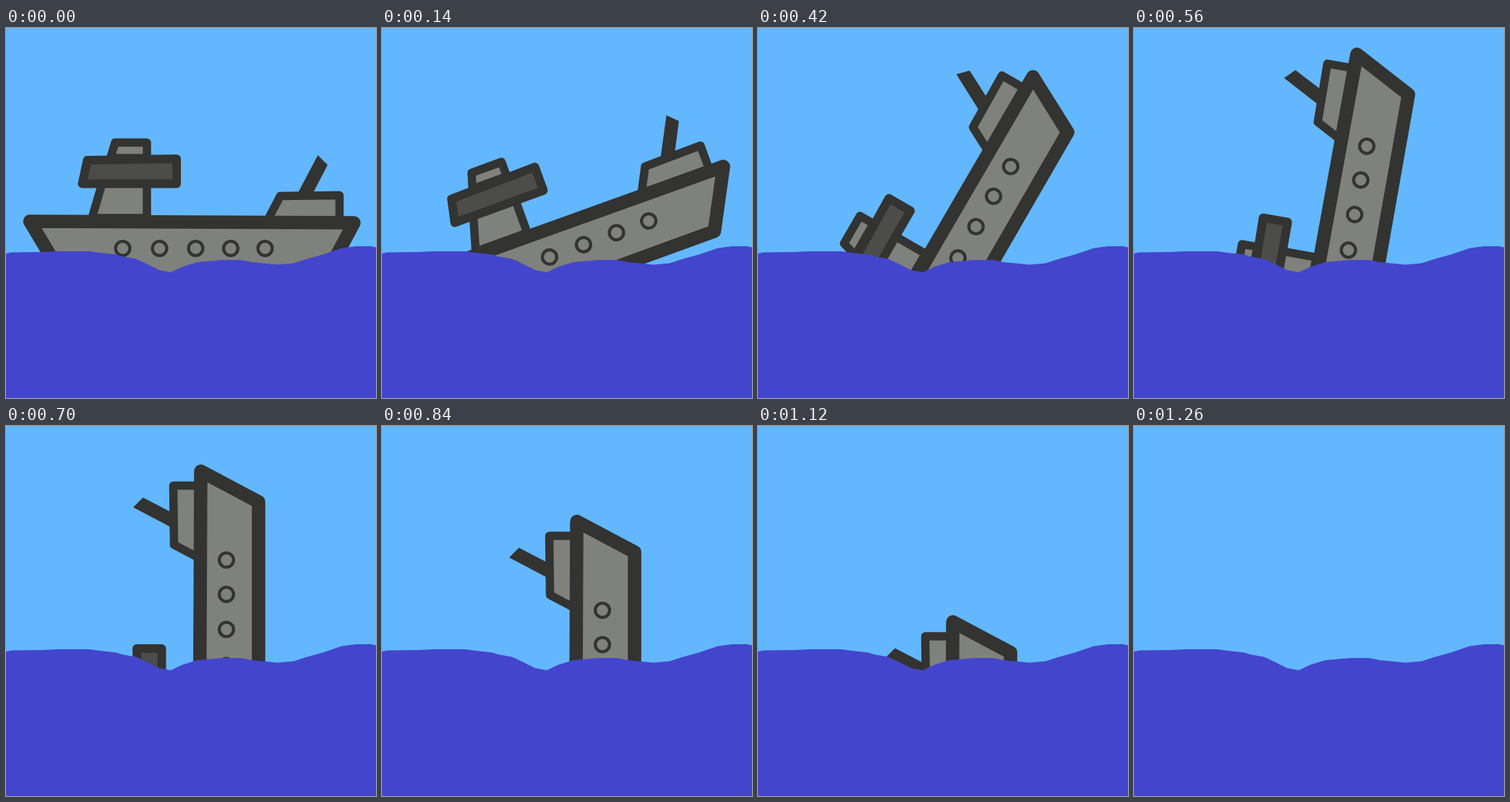
An HTML page that plays this animation: 512x512 px, repeating every 1.33 s.

```html
<!DOCTYPE html>
<html lang="en">
<head>
<meta charset="utf-8">
<title>Sinking ship</title>
<style>
  html, body { margin: 0; height: 100%; overflow: hidden; background: #63b7ff; }
  svg { display: block; width: 100vw; height: 100vh; }
  #ship { fill: #7f817d; stroke: #333331; stroke-width: 11.5; stroke-linejoin: round; }
</style>
</head>
<body>
<svg viewBox="0 0 512 512">
  <g id="ship">
    <path d="M119 263L133 215H195V263Z"/>
    <path d="M144.500 180L151 158.500H195V180Z"/>
    <path d="M112.500 183L236 181V215.500H105.500Z" fill="#4c4c4a" stroke-width="12"/>
    <path d="M431.500 176L445 189.500L424 230H403Z" fill="#333331" stroke="none"/>
    <path d="M362 266L379.500 232.500L461.500 231.500V266Z"/>
    <path d="M33 267.500L481.500 269.500L439 349.500H82Z" stroke-width="18.500"/>
    <g id="portholes" stroke-width="4.300"></g>
  </g>
  <path fill="#4346cc" d="M0 312L8 310.500L50 310L70 309H115L130 311L153 313.500L160 316L180 319.500L195 326.500L212 335L228 338L245 330L265 324L300 321H325L340 324L376 327.500L398 325.500L415 320L440 313L465 304.500L485 302H505L512 303.500V512H0Z"/>
</svg>
<script>
  const STEP = 70, STEPS = 19;
  const ship = document.getElementById('ship');

  document.getElementById('portholes').innerHTML = [161.5, 212.5, 262.5, 311, 358.5]
    .map(x => `<circle cx="${x}" cy="305" r="9.900"/>`).join('');

  // Tip the bow up to vertical, then slide under the water.
  function draw(now) {
    const step = Math.floor(now / STEP) % STEPS;
    const angle = -Math.min(90, step * 10);
    const drop = Math.max(0, 34.75 * (step - 9.08));
    ship.setAttribute('transform', `translate(0 ${drop}) rotate(${angle} 256 256)`);
    requestAnimationFrame(draw);
  }
  draw(performance.now());
</script>
</body>
</html>
```
